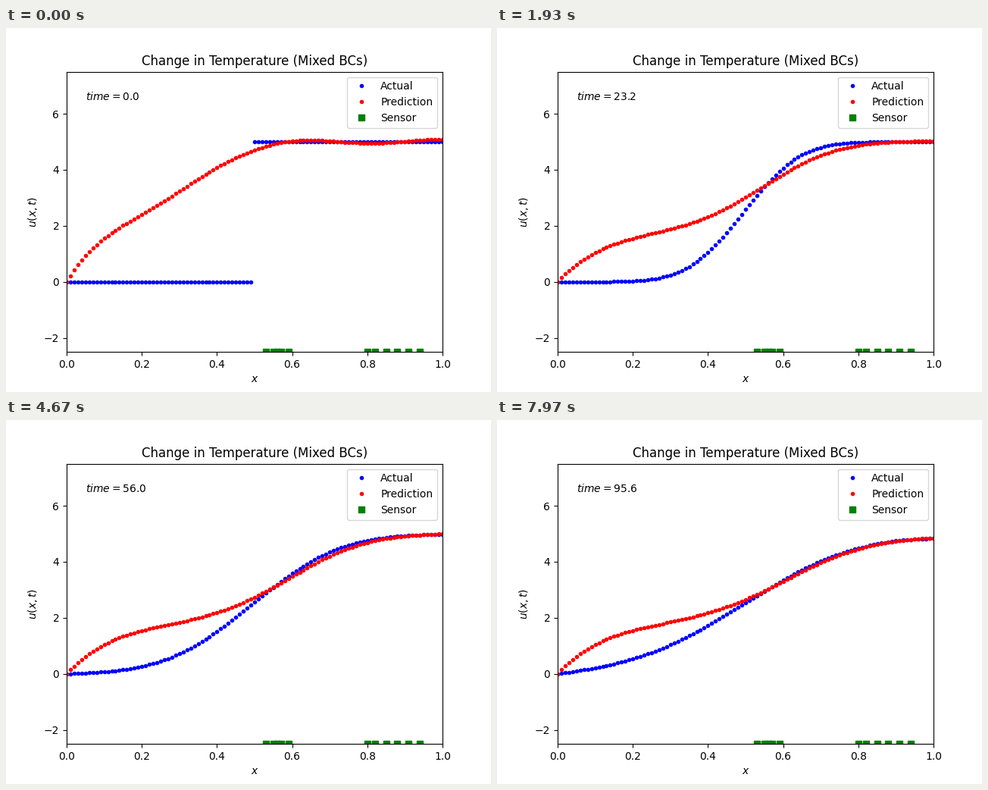
Animation of 640x480 px, one loop 8000 ms. Source, as a matplotlib script:

```python
import math

import numpy as np
import matplotlib.pyplot as plt
from matplotlib.animation import FuncAnimation

TICK = 20           # ms per drawn frame
TICKS = 400
STEPS_PER_TICK = 0.6
DT = 0.4            # simulated time per step
DIFFUSIVITY = 3e-4
JUMP = 0.495        # place of the initial jump
HOT = 5.0

x = np.linspace(0, 1, 101)
sensors = [0.53, 0.55, 0.56, 0.57, 0.59, 0.80, 0.82, 0.85, 0.88, 0.91, 0.94]
erf = np.vectorize(math.erf)


def edge(center, sigma):
    """Smooth rise from 0 to 1."""
    return 0.5 * (1 + erf((x - center) / (sigma * math.sqrt(2))))


def actual(t):
    """Heat equation with u = 0 on the left and no flux on the right."""
    if t == 0:
        return np.where(x > JUMP, HOT, 0.0)
    sigma = math.sqrt(2 * DIFFUSIVITY * t)
    return HOT * (edge(JUMP, sigma) - edge(2 - JUMP, sigma)
                  - edge(JUMP - 2, sigma) + edge(-JUMP, sigma))


def prediction(t):
    """A saturating rise on the left plus a smooth edge drifting right."""
    early = math.exp(-t / 4)
    rise = (1.92 + 0.68 * early) * (1 - np.exp(-x / (0.128 - 0.013 * early)))
    front = edge(0.64 - 0.29 / (1 + t / 10),
                 0.143 + 0.00035 * t - 0.023 * early)
    height = 3.11 - 0.69 * early - (t / 156)**4
    ripple = 0.07 * early * np.cos(2 * np.pi * (x - 0.62) / 0.38)
    return rise + front * (height + ripple)


fig, ax = plt.subplots(figsize=(6.4, 4.8), dpi=100)
true_dots, = ax.plot(x, actual(0), "b.", label="Actual")
fit_dots, = ax.plot(x, prediction(0), "r.", label="Prediction")
ax.plot(sensors, [-2.5] * len(sensors), "gs", label="Sensor")
clock = ax.text(0.05, 6.5, "$time = 0.0$")
ax.set(xlim=(0, 1), ylim=(-2.5, 7.5), xlabel="$x$", ylabel="$u(x,t)$",
       title="Change in Temperature (Mixed BCs)")
ax.legend(loc="upper right")


def update(i):
    t = DT * round(STEPS_PER_TICK * i)
    true_dots.set_ydata(actual(t))
    fit_dots.set_ydata(prediction(t))
    clock.set_text(f"$time = {t:.1f}$")
    return true_dots, fit_dots, clock


anim = FuncAnimation(fig, update, frames=TICKS, interval=TICK,
                     repeat=True, repeat_delay=0)
plt.show()
```
